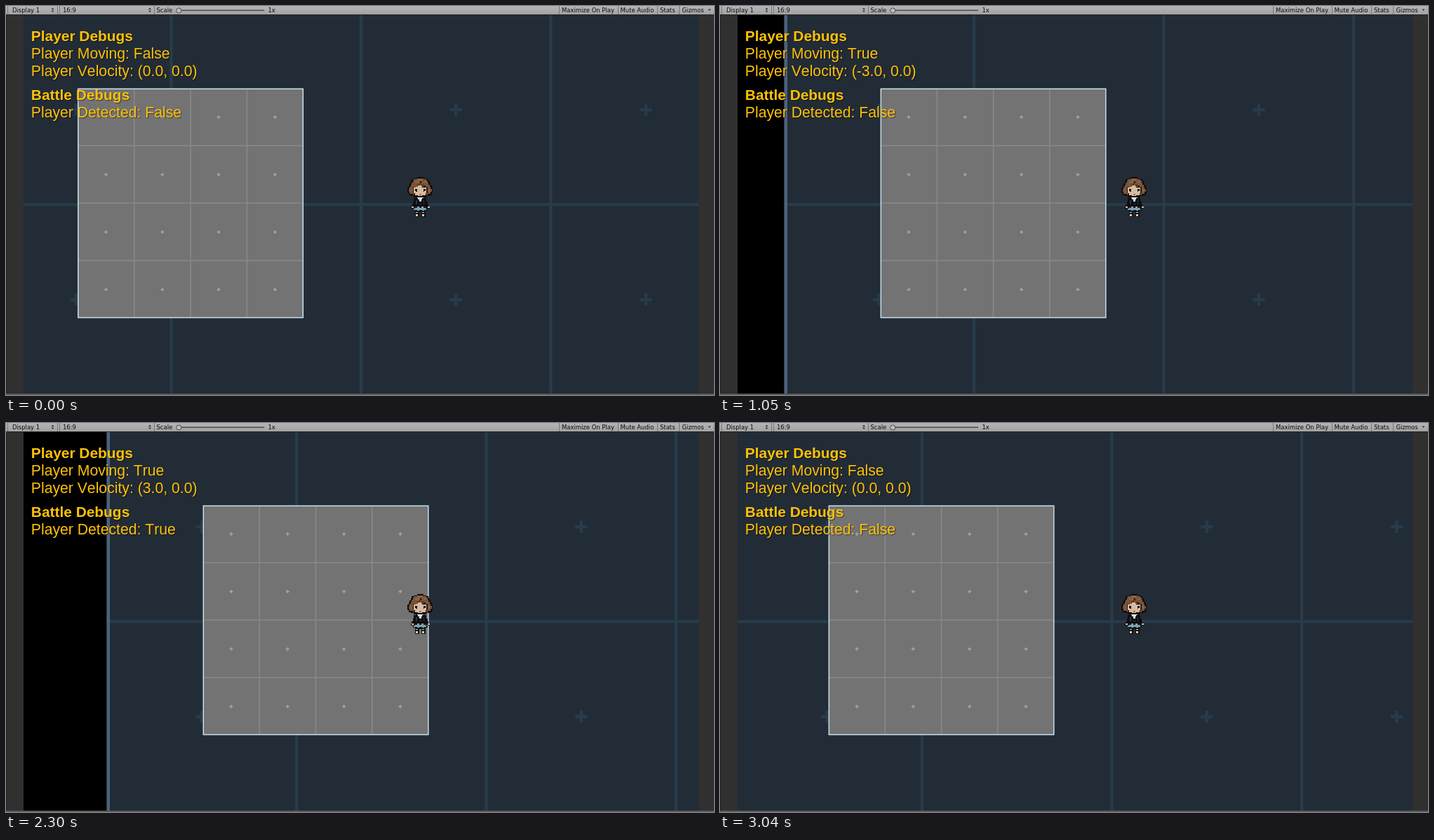
Recreate the animation shown at these times as an HTML page. Size 1009 px wide and 555 px high, loop 3120 ms.

```html
<!DOCTYPE html>
<html lang="en">
<head>
<meta charset="utf-8">
<title>Battle grid debug view</title>
<style>
  html, body { margin: 0; width: 100%; height: 100%; overflow: hidden; background: #303030; }
  svg { display: block; width: 1009px; height: 555px; }
  .bar text { font: 8.45px "DejaVu Sans", sans-serif; fill: #0c0c0c; }
  .hud text {
    font: 21.2px "Liberation Sans", Arial, sans-serif;
    font-kerning: none;
    fill: #ffc107;
    text-shadow: 1px 1px 1px rgba(0, 0, 0, .5);
  }
  .hud .head { font-weight: bold; font-size: 20.9px; }
</style>
</head>
<body>
<svg viewBox="0 0 1009 555">
  <defs>
    <clipPath id="view"><rect x="25" y="13" width="962" height="540"/></clipPath>
    <linearGradient id="metal" x2="0" y2="1">
      <stop offset="0" stop-color="#b4b4b4"/>
      <stop offset="1" stop-color="#a2a2a2"/>
    </linearGradient>
    <filter id="soft" x="-5%" y="-5%" width="110%" height="110%"><feGaussianBlur stdDeviation=".5"/></filter>
  </defs>

  <rect width="1009" height="555" fill="#303030"/>
  <rect y="12" width="1" height="543" fill="#222"/>
  <rect y="553" width="1009" height="2" fill="#585858"/>

  <g clip-path="url(#view)">
    <rect x="25" y="13" width="962" height="540" fill="#000"/>
    <g id="world">
      <rect x="-35" y="0" width="1200" height="560" fill="#222c37"/>
      <g filter="url(#soft)">
        <path id="lines" fill="none" stroke="#283c4b" stroke-width="4"/>
        <path id="marks" fill="none" stroke="#283b4a" stroke-width="4.5"/>
      </g>
      <rect x="-35" y="0" width="4.5" height="560" fill="#4c627c"/>
      <rect x="103" y="118" width="320" height="327" fill="#737373"/>
      <path id="cells" fill="none" stroke="#898989" stroke-width="1.5"/>
      <path id="dots" fill="none" stroke="#a8a8a8" stroke-width="1.3"/>
      <rect x="102.8" y="118.2" width="320.5" height="326.4" fill="none" stroke="#c9e1eb" stroke-width="1.5"/>
    </g>

    <g transform="translate(572 244) scale(1.5)" shape-rendering="crispEdges">
      <!-- hair -->
      <path fill="#100c0b" d="M9 0h6v1h3v1h2v2h1v2h1v2h1v2h1v5h-1v2h-2v1h-3v1h-2v1H8v-1H6v-1H3v-1H1v-2H0v-5h1V8h1V6h1V4h1V2h2V1h3z"/>
      <path fill="#795439" d="M9 1h6v1h3v1h1v2h1v2h1v2h1v2h1v3h-1v2h-3v1H5v-1H2v-2H1v-3h1V9h1V7h1V5h1V3h1V2h3z"/>
      <path fill="#916747" d="M9 2h5v1H9zM7 4h4v1H7zM15 4h3v1h-3zM3 11h1v3H3zM20 11h1v3h-1z"/>
      <!-- face -->
      <path fill="#d6bba0" d="M6 10h2V9h2V8h3v1h3v1h2v5h-1v2h-2v1H9v-1H7v-2H6z"/>
      <path fill="#2c1c14" d="M12 4h1v2h-1zM11 6h1v1h-1zM9 7h2v1H9zM13 7h2v1h-2zM15 8h2v1h-2zM5 9h1v6H5zM18 9h1v6h-1zM6 15h1v2H6zM17 15h1v2h-1z"/>
      <path fill="#0d0b0c" d="M7 11h2v3H8v-1H7zM15 11h2v2h-1v1h-1zM8 17h2v1H8zM14 17h2v1h-2zM14 9h3v1h-3z"/>
      <path fill="#eee5da" d="M7 13h1v1H7zM16 13h1v1h-1z"/>
      <path fill="#a8725c" d="M11 16h2v1h-2z"/>
      <!-- jacket and hands -->
      <path fill="#0d0e12" d="M8 19h8v1h2v3h1v3h1v2h1v1h-3v1H6v-1H3v-1h1v-2h1v-3h1v-3h2z"/>
      <path fill="#303640" d="M8 22h1v4H8zM15 22h1v4h-1zM11 25h2v1h-2z"/>
      <path fill="#e4e6e3" d="M9 19h6v1h-1v1h-1v2h-2v-2h-1v-1H9z"/>
      <path fill="#d6bba0" d="M4 28h2v1H4zM19 28h2v1h-2z"/>
      <path fill="#0d0e12" d="M3 29h2v1H3zM19 29h2v1h-2z"/>
      <!-- skirt and legs -->
      <path fill="#111a20" d="M6 28h12v2h1v2h-2v1H7v-1H5v-2h1z"/>
      <path fill="#7da4b2" d="M7 29h2v-1h2v1h2v-1h2v1h2v1h1v1h-2v1h-2v-1h-3v1H9v-1H6v-1h1z"/>
      <path fill="#111" d="M7 32h4v6H7zM13 32h4v6h-4z"/>
      <path fill="#d6cbb8" d="M8 33h2v1H8zM8 35h2v2H8zM14 33h2v1h-2zM14 35h2v2h-2z"/>
    </g>
  </g>

  <g class="hud">
    <text class="head" x="35.800" y="49.5">Player Debugs</text>
    <text id="moving" x="35.800" y="74.5"></text>
    <text id="speed" x="35.800" y="99.5"></text>
    <text class="head" x="35.800" y="134">Battle Debugs</text>
    <text id="found" x="35.800" y="159"></text>
  </g>

  <g class="bar">
    <rect width="1009" height="12" fill="url(#metal)"/>
    <rect y="12" width="1009" height="1" fill="#252525"/>
    <path stroke="#777" d="M2.5 0v12M73.5 0v12M76.5 0v12M211.5 0v12M788.5 0v12M872.5 0v12M928.5 0v12M959.5 0v12"/>
    <text x="9" y="8.8">Display 1</text>
    <text x="81" y="8.8">16:9</text>
    <text x="214.5" y="9.3">Scale</text>
    <text x="373.5" y="9.3">1x</text>
    <text x="792" y="8.8">Maximize On Play</text>
    <text x="875.5" y="8.8">Mute Audio</text>
    <text x="932" y="8.8">Stats</text>
    <text x="963.5" y="8.8">Gizmos</text>
    <path fill="#333" d="M64.5 5h4l-2-2.5zM64.5 6.5h4l-2 2.5zM203 5h4l-2-2.5zM203 6.5h4l-2 2.5zM1000.5 4.5h4l-2 2.5z"/>
    <path stroke="#4c4c4c" stroke-width="1.5" d="M250 6.3H368"/>
    <circle cx="246.3" cy="6.5" r="3.6" fill="#bcbcbc" stroke="#4a4a4a"/>
  </g>
</svg>

<script>
const LOOP = 3120, TILE = 270.5;
const $ = id => document.getElementById(id);
const plus = (x, y, r) => `M${x - r} ${y}h${2 * r}M${x} ${y - r}v${2 * r}`;

// Floor tiles
let lines = 'M-35 283.2H1165', marks = '';
for (let i = 0; i < 4; i++) {
  lines += `M${235.5 + i * TILE} 0V560`;
  for (const y of [148, 419]) marks += plus(100.3 + i * TILE, y, 8.7);
}
$('lines').setAttribute('d', lines);
$('marks').setAttribute('d', marks);

// Battle cells
let cells = '', dots = '';
for (let i = 0; i < 4; i++) {
  if (i) cells += `M${102.4 + i * 80.3} 118V445M103 ${117.2 + i * 82}H423`;
  for (let j = 0; j < 4; j++) dots += plus(142.5 + i * 80.3, 158.5 + j * 82, 2.5);
}
$('cells').setAttribute('d', cells);
$('dots').setAttribute('d', dots);

const walkLeft = [370, 440, 520, 600, 670, 740, 810, 890, 970, 1050, 1130, 1200, 1280, 1360, 1450, 1530];
const walkRight = [2220, 2290, 2370, 2440, 2520, 2590, 2670, 2750, 2820, 2900, 2970, 3040];
const ticks = (list, t) => list.filter(v => v <= t).length;

function offset(t) {
  const back = ticks(walkRight, t);
  if (back) return Math.max(52.5, 204.5 - 13 * back);
  const n = ticks(walkLeft, t);
  if (n <= 2) return 13 * n;
  return n <= 10 ? 26 + (n - 2) * 12.5625 : 126.5 + (n - 10) * 13;
}

function velocity(t) {
  if (t >= 290 && t < 1610) return -3;
  return t >= 2140 && t < 3040 ? 3 : 0;
}

const label = on => on ? 'True' : 'False';
function put(id, text) {
  if ($(id).textContent !== text) $(id).textContent = text;
}

function draw(t) {
  const x = offset(t), v = velocity(t);
  $('world').setAttribute('transform', `translate(${x} 0)`);
  put('moving', `Player Moving: ${label(v)}`);
  put('speed', `Player Velocity: (${v.toFixed(1)}, 0.0)`);
  put('found', `Player Detected: ${label(x >= 170)}`);
}

const start = performance.now();
function tick() {
  draw((performance.now() - start) % LOOP);
  requestAnimationFrame(tick);
}
tick();
</script>
</body>
</html>
```
